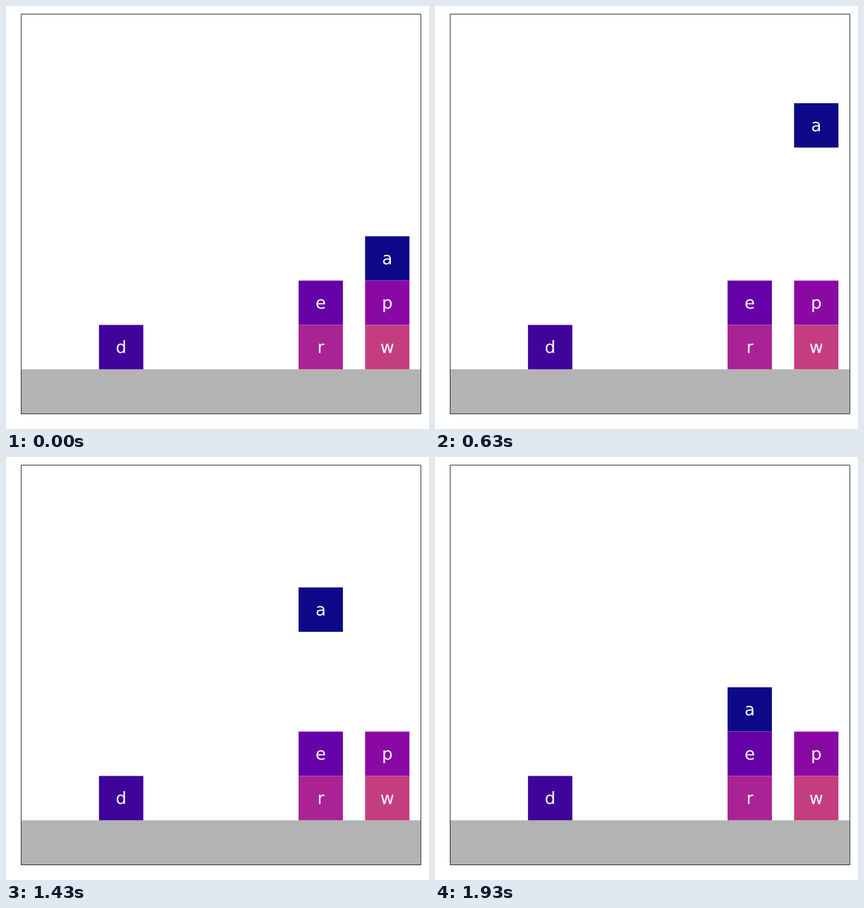
A matplotlib script that plays this animation: 600 px wide and 600 px high, repeating every 1.96 s.

```python
import matplotlib.pyplot as plt
from matplotlib.animation import FuncAnimation
from matplotlib.patches import PathPatch, Rectangle
from matplotlib.textpath import TextPath
from matplotlib.transforms import Affine2D

SIZE, DPI = 600, 100
UNITS = 9                        # the stage is 9 blocks wide and high
LEFT, MARGIN = 21.75, 12.0       # stage insets in pixels
STAGE = SIZE - LEFT - MARGIN
UNIT = STAGE / UNITS
LINE = 0.75                      # frame line in pixels
FONT_PX = 24
BASELINE = 0.346 * FONT_PX       # drop from the block centre
TICK_MS, LOOP_MS = 10, 1960
SPEED = 0.15                     # blocks per step, at 30 steps per second
LIFT, SHIFT = 3.0, 1.5

fig = plt.figure(figsize=(SIZE / DPI, SIZE / DPI), dpi=DPI, facecolor="white")
ax = fig.add_axes([0, 0, 1, 1])
ax.set(xlim=(0, SIZE), ylim=(0, SIZE))
ax.axis("off")


def to_px(value):
    return LEFT + value * UNIT


def add_rect(x, y, width, color):
    rect = Rectangle((to_px(x), to_px(y)), width * UNIT, UNIT,
                     facecolor=color, edgecolor="none", snap=False)
    return ax.add_patch(rect)


def glyph(text):
    return TextPath((0, 0), text, size=FONT_PX, prop={"family": "DejaVu Sans"})


def advance(letter):
    """Step from one letter to the next when it is set twice."""
    return glyph(letter * 2).get_extents().width - glyph(letter).get_extents().width


class Block:
    def __init__(self, letter, shade, x, y):
        self.rect = add_rect(x, y, 1, plt.cm.plasma(24 * shade))
        self.half = advance(letter) / 2
        self.label = ax.add_patch(PathPatch(glyph(letter), facecolor="white",
                                            edgecolor="none", snap=False))
        self.move_to(x, y)

    def move_to(self, x, y):
        self.rect.set_xy((to_px(x), to_px(y)))
        shift = Affine2D().translate(to_px(x + 0.5) - self.half,
                                     to_px(y + 0.5) - BASELINE)
        self.label.set_transform(shift + ax.transData)


def column(slot):
    return 0.25 + 1.5 * slot


add_rect(0, 0, UNITS, "0.7")
START = (column(5), 3)
mover = Block("a", 0, *START)
for letter, shade, slot, level in [("d", 1, 1, 1), ("e", 2, 4, 2), ("p", 3, 5, 2),
                                   ("r", 4, 4, 1), ("w", 5, 5, 1)]:
    Block(letter, shade, column(slot), level)

# The frame line lies just outside the stage.
ax.add_patch(Rectangle((LEFT - LINE / 2, LEFT - LINE / 2), STAGE + LINE, STAGE + LINE,
                       fill=False, edgecolor="black", linewidth=LINE * 72 / DPI,
                       snap=False))


def travelled(step, first, distance):
    """Distance covered at constant speed; the first step counts double."""
    if step < first:
        return 0.0
    return min((step - first + 2) * SPEED, distance)


def update(tick):
    step = (30 * tick + 15) // 100    # 30 steps per second, rounded to 10 ms
    up = travelled(step, 1, LIFT)
    left = travelled(step, 30, SHIFT)
    down = min(max(step - 38, 0) * SPEED, LIFT)
    mover.move_to(START[0] - left, START[1] + up - down)
    return mover.rect, mover.label


anim = FuncAnimation(fig, update, frames=LOOP_MS // TICK_MS, interval=TICK_MS,
                     repeat=True, repeat_delay=0)
plt.show()
```
